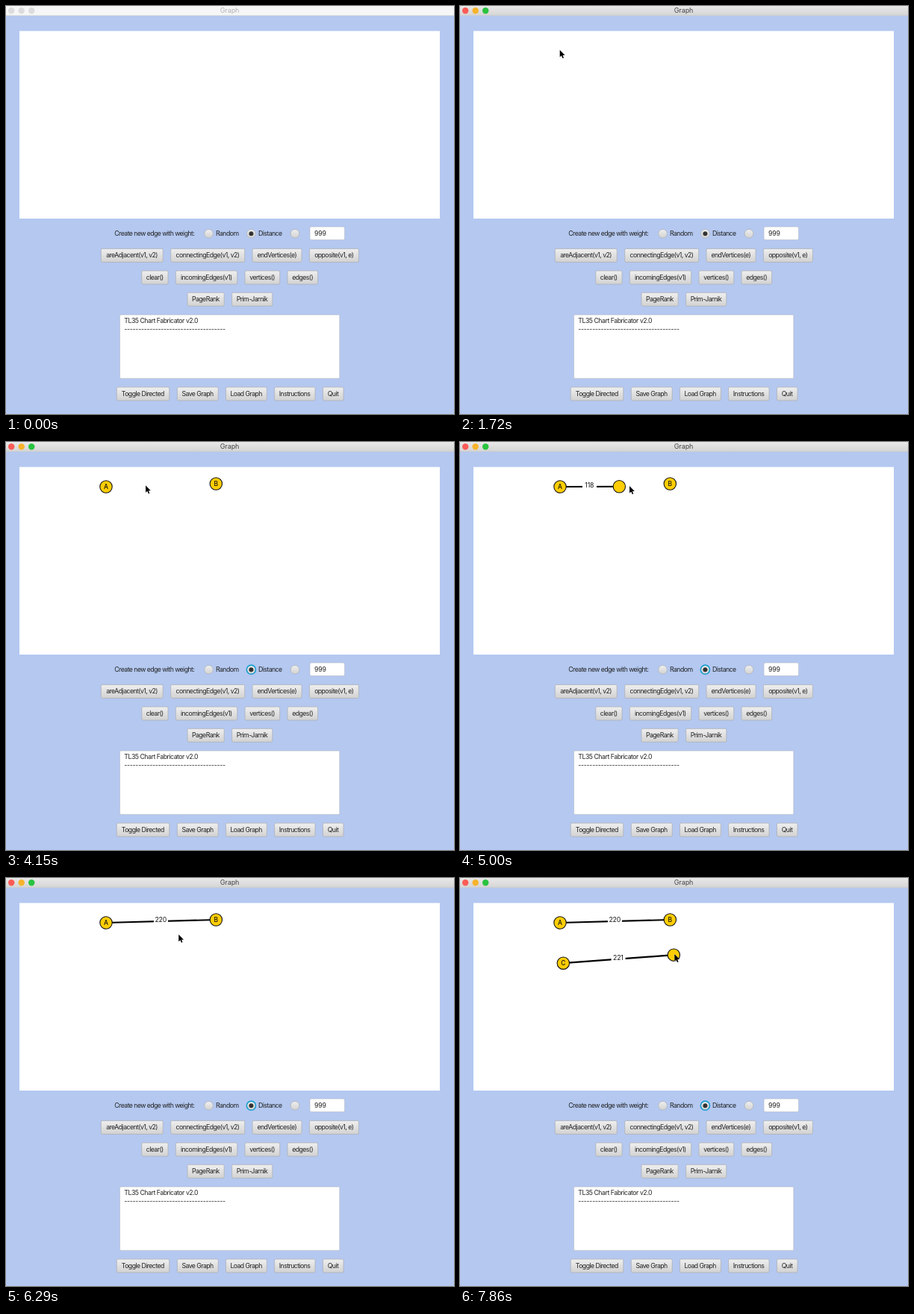
An HTML page for the animation above (8 s loop, 600 by 547 pixels).

```html
<!DOCTYPE html>
<html lang="en">
<head>
<meta charset="utf-8">
<title>Graph</title>
<style>
  html, body { margin: 0; width: 100%; height: 100%; overflow: hidden; background: #b4c8f0; }
  svg { display: block; width: 600px; height: 547px; }
  text { font: 8.7px Inter, Roboto, sans-serif; letter-spacing: -.54px; fill: #222; white-space: pre; }
  .mid { text-anchor: middle; }
  .title { font-size: 9px; letter-spacing: -.05px; fill: #b2b2b2; }
  .log { letter-spacing: -.46px; }
  .dashes { letter-spacing: -.23px; }
  .num { letter-spacing: -.15px; }
  .tag { letter-spacing: -.15px; fill: #111; }
  .active .title { fill: #444; }
  .bar { fill: #f6f6f6; }
  .active .bar { fill: url(#barFill); }
  .light { fill: #dcdcdc; }
  .active .red { fill: #fc5b57; }
  .active .amber { fill: #f6b32b; }
  .active .green { fill: #29c33f; }
  .node circle { fill: #ffcd05; stroke: #111; stroke-width: 1.1; }
  .node text { font-size: 8.4px; font-weight: 500; letter-spacing: 0; fill: #111; }
  .edge line { stroke: #000; stroke-width: 2.2; }
  .edge rect { fill: #fff; }
</style>
</head>
<body>
<svg id="stage" viewBox="0 0 600 547">
  <defs>
    <linearGradient id="barFill" x2="0" y2="1">
      <stop stop-color="#e9e9e9"/><stop offset="1" stop-color="#d4d4d4"/>
    </linearGradient>
    <linearGradient id="btnFill" x2="0" y2="1">
      <stop stop-color="#efefef"/><stop offset="1" stop-color="#d2d2d2"/>
    </linearGradient>
  </defs>
  <rect width="600" height="547" fill="#b4c8f0"/>
  <rect class="bar" width="600" height="13"/>
  <rect y="12.6" width="600" height=".7" fill="#c3c5cb"/>
  <circle class="light red" cx="7.2" cy="6.2" r="4.2"/>
  <circle class="light amber" cx="20.7" cy="6.2" r="4.2"/>
  <circle class="light green" cx="34.2" cy="6.2" r="4.2"/>
  <text class="title mid" x="299.5" y="9.4">Graph</text>
  <rect x="18" y="33.5" width="563" height="251.5" fill="#fff"/>

  <text x="145.3" y="308">Create new edge with weight:</text>
  <text x="281" y="308.2">Random</text>
  <text x="338" y="308.2">Distance</text>
  <g id="radios"></g>
  <circle id="ring" cx="328.4" cy="305.2" r="6.1" fill="none" stroke="#1b9fd0" stroke-width="1.6"/>
  <circle cx="328.4" cy="305.2" r="3" fill="#333"/>
  <rect x="407" y="296" width="46.5" height="17.5" rx="2" fill="#fff" stroke="#b9bfcc" stroke-width=".7"/>
  <text class="num" x="413" y="308">999</text>

  <g id="buttons"></g>

  <rect x="152.5" y="414" width="294.3" height="85.3" rx="1.5" fill="#fff" stroke="#b9bfcc" stroke-width=".7"/>
  <text class="log" x="158.3" y="425.2">TL35 Chart Fabricator v2.0</text>
  <text class="dashes" id="dashes" x="158.3" y="436.4"></text>

  <g id="edges"></g>
  <g id="nodes"></g>
  <g id="tip">
    <rect x="258.4" y="38.5" width="43.4" height="10.8" rx="3" fill="#fff" stroke="#111" stroke-width="1"/>
    <text class="mid" x="280" y="47" style="letter-spacing:-.25px">Add Edge?</text>
  </g>
  <path id="cursor" d="M0 0V9.6L2.2 7.6 3.7 11.1 5.3 10.4 3.8 7H6.8Z" fill="#000" stroke="#fff" stroke-width=".7" paint-order="stroke"/>
</svg>
<script>
const $ = id => document.getElementById(id);
const show = (el, on) => { el.style.display = on ? '' : 'none'; };

function add(parent, tag, attrs, text) {
  const el = document.createElementNS('http://www.w3.org/2000/svg', tag);
  for (const k in attrs) el.setAttribute(k, attrs[k]);
  if (text) el.textContent = text;
  return parent.appendChild(el);
}

// Each row: centre y, then label, left, right.
const rows = [
  [334.4, ['areAdjacent(v1, v2)', 127.3, 210.2], ['connectingEdge(v1, v2)', 220.7, 319.7],
    ['endVertices(e)', 330, 396], ['opposite(v1, e)', 406.4, 472.4]],
  [364, ['clear()', 181.8, 217], ['incomingEdges(v1)', 227.3, 309.7],
    ['vertices()', 320, 366.7], ['edges()', 377, 417.6]],
  [393.3, ['PageRank', 243, 292.2], ['Prim-Jarnik', 302.6, 356.8]],
  [520, ['Toggle Directed', 148.2, 218.8], ['Save Graph', 229.3, 284.2], ['Load Graph', 294.4, 349.3],
    ['Instructions', 359.6, 414], ['Quit', 424.4, 452]]
];
for (const [y, ...items] of rows)
  for (const [label, left, right] of items) {
    add($('buttons'), 'rect', { x: left, y: y - 9, width: right - left, height: 18, rx: 1.8,
      fill: 'url(#btnFill)', stroke: '#aeb0b6', 'stroke-width': .8 });
    add($('buttons'), 'text', { class: 'mid', x: (left + right) / 2 - .2, y: y + 3 }, label);
  }
for (const x of [271.5, 328.4, 387])
  add($('radios'), 'circle', { cx: x, cy: 305.2, r: 5.8, fill: 'url(#btnFill)', stroke: '#b2b4ba', 'stroke-width': .8 });
$('dashes').textContent = '-'.repeat(36);

function makeNode(x, y, name) {
  const g = add($('nodes'), 'g', { class: 'node' });
  add(g, 'circle', { r: 8.2 });
  if (name) add(g, 'text', { class: 'mid', y: 3.1 }, name);
  const node = { g, move(px, py) {
    node.x = px; node.y = py;
    g.setAttribute('transform', `translate(${px} ${py})`);
  } };
  node.move(x, y);
  return node;
}

function makeEdge() {
  const g = add($('edges'), 'g', { class: 'edge' });
  const line = add(g, 'line', {});
  const gap = add(g, 'rect', { width: 19, height: 11 });
  const tag = add(g, 'text', { class: 'mid tag' });
  return { g, join(a, b) {
    const mx = (a.x + b.x) / 2, my = (a.y + b.y) / 2;
    const ends = { x1: a.x, y1: a.y, x2: b.x, y2: b.y };
    for (const k in ends) line.setAttribute(k, ends[k]);
    gap.setAttribute('x', mx - 9.7);
    gap.setAttribute('y', my - 6.5);
    tag.setAttribute('x', mx - .4);
    tag.setAttribute('y', my + 1.4);
    tag.textContent = Math.floor(Math.hypot(b.x - a.x, b.y - a.y) * 1.494);
  } };
}

const A = makeNode(134, 60, 'A');
const B = makeNode(281.3, 56, 'B');
const C = makeNode(138.3, 114.2, 'C');
const ghost = makeNode(0, 0);
const edgeAB = makeEdge(), dragged = makeEdge();
edgeAB.join(A, B);

// Pointer path: tick, x, y, and 1 for an eased arrival. Seven ticks a second.
const path = [
  [1, 250, 518], [6, 133.7, 59, 1], [16, 133.7, 59], [22, 281, 55, 1], [26, 281, 55],
  [31, 136, 60, 1], [33, 136, 60], [35, 227, 59], [37, 276, 56], [38, 281.5, 55],
  [42, 281.5, 55], [47, 138.6, 113.6, 1], [50, 138.6, 113.6], [52, 190, 110],
  [54, 285.5, 102.5], [55, 287.3, 102]
];
function pointer(n) {
  const i = path.findIndex(p => p[0] >= n);
  if (i < 1) return i ? path[path.length - 1].slice(1, 3) : path[0].slice(1, 3);
  const [n0, x0, y0] = path[i - 1], [n1, x1, y1, eased] = path[i];
  let u = (n - n0) / (n1 - n0);
  if (eased) u = u * u * (3 - 2 * u);
  return [x0 + (x1 - x0) * u, y0 + (y1 - y0) * u];
}

// Screen updates fall on seventh-seconds, rounded up to 10 ms.
function tickAt(ms) {
  const n = Math.floor(ms * 7 / 1000 + 1e-9);
  return Math.ceil(n * 100 / 7 - 1e-9) * 10 > ms ? n - 1 : n;
}

function draw() {
  const n = tickAt(performance.now() % 8000);
  const [x, y] = pointer(n);
  $('cursor').setAttribute('transform', `translate(${x} ${y})`);
  show($('cursor'), n >= 1);
  $('stage').classList.toggle('active', n >= 10);
  show($('ring'), n >= 14);
  show(A.g, n >= 14);
  show(B.g, n >= 24);
  show(C.g, n >= 48);
  show(edgeAB.g, n >= 41);

  const toB = n >= 34 && n < 41, dragging = toB || n >= 51;
  const [gx, gy] = pointer(n - .29);
  ghost.move(gx - .5, gy + (toB ? .6 : 1));
  const over = toB && Math.hypot(ghost.x - B.x, ghost.y - B.y) < 8;
  show(ghost.g, dragging && !over);
  show(dragged.g, dragging);
  show($('tip'), over);
  if (dragging) dragged.join(toB ? A : C, ghost);
  requestAnimationFrame(draw);
}
draw();
</script>
</body>
</html>
```
